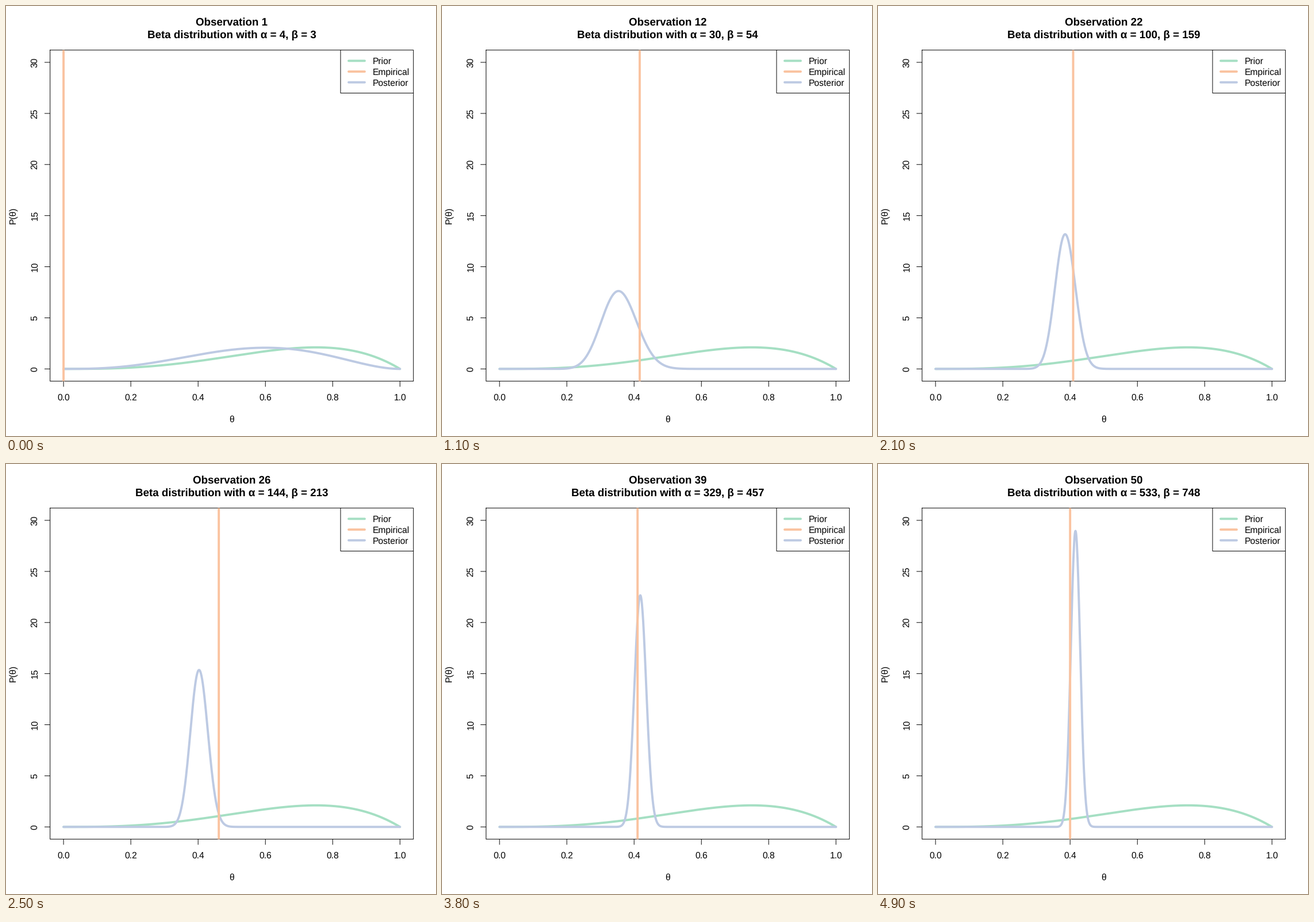
These frames come from a looping animation (748x748 px, 5 s). A matplotlib script:

```python
import math

import matplotlib.pyplot as plt
import numpy as np
from matplotlib.animation import FuncAnimation

plt.rcParams.update({
    "font.family": "Liberation Sans",
    "font.size": 12,
    "text.hinting": "none",
    "toolbar": "None",
})

SIZE, DPI = 748, 93.5
FRAMES, INTERVAL = 50, 100
LINE = 18.7  # height of one margin line in pixels
LEFT, RIGHT = 4.1 * LINE, SIZE - 2.1 * LINE
TOP, BOTTOM = 4.1 * LINE, SIZE - 5.1 * LINE
MID_X, MID_Y = (LEFT + RIGHT) / 2, (TOP + BOTTOM) / 2
THIN, THICK = 0.75, 3.0
GREEN, ORANGE, BLUE = "#a5dfc3", "#fac3a0", "#bdcae3"

PRIOR = (4, 2)
SUCCESSES = (3, 6, 8, 10, 12, 14, 16, 20, 22, 23, 24, 26,
             27, 29, 36, 39, 41, 43, 45, 47)
trials = np.arange(1, FRAMES + 1)
heads = np.cumsum(np.isin(trials, SUCCESSES))
alphas = PRIOR[0] + np.cumsum(heads)
betas = PRIOR[1] + np.cumsum(trials - heads)
theta = np.linspace(1e-9, 1 - 1e-9, 1001)


def px(x):
    return LEFT + (x + 0.04) / 1.08 * (RIGHT - LEFT)


def py(y):
    return BOTTOM - (y / 30 + 0.04) / 1.08 * (BOTTOM - TOP)


def beta_pdf(a, b):
    log_norm = math.lgamma(a + b) - math.lgamma(a) - math.lgamma(b)
    return np.exp(log_norm + (a - 1) * np.log(theta) + (b - 1) * np.log1p(-theta))


fig = plt.figure(figsize=(SIZE / DPI, SIZE / DPI), dpi=DPI, facecolor="white")
ax = fig.add_axes([0, 0, 1, 1])
ax.set(xlim=(0, SIZE), ylim=(SIZE, 0))
ax.axis("off")


def stroke(xs, ys, color="black", width=THIN, cap="round", z=2):
    return ax.plot(xs, ys, color=color, lw=width, solid_capstyle=cap,
                   solid_joinstyle="round", snap=False, zorder=z)[0]


def label(x, y, text, ha="center", **style):
    return ax.text(x, y, text, ha=ha, va="baseline",
                   rotation_mode="anchor", **style)


# Frame and axes
stroke([LEFT, RIGHT, RIGHT, LEFT, LEFT], [TOP, TOP, BOTTOM, BOTTOM, TOP])
for i in range(6):
    x, y = px(i / 5), py(5 * i)
    stroke([x, x], [BOTTOM, BOTTOM + LINE / 2])
    label(x, BOTTOM + 1.8 * LINE, f"{i / 5:.1f}")
    y = py(5 * i)
    stroke([LEFT - LINE / 2, LEFT], [y, y])
    label(LEFT - 1.2 * LINE, y, str(5 * i), rotation=90)
y = py(30)
stroke([LEFT - LINE / 2, LEFT], [y, y])
label(LEFT - 1.2 * LINE, y, "30", rotation=90)
label(MID_X, BOTTOM + 3.8 * LINE, "θ")
label(LEFT - 3.2 * LINE, MID_Y, "P(θ)", rotation=90)

# Legend
legend_x, legend_y = 582, TOP + 4 * LINE
stroke([legend_x, legend_x, RIGHT], [TOP, legend_y, legend_y])
for row, (name, color) in enumerate(
        [("Prior", GREEN), ("Empirical", ORANGE), ("Posterior", BLUE)], 1):
    y = TOP + row * LINE
    stroke([legend_x + 14, legend_x + 42], [y, y], color, THICK)
    label(legend_x + 56, y + 5.6, name, ha="left")

# Curves
stroke(px(theta), py(beta_pdf(*PRIOR)), GREEN, THICK, z=3)
posterior = stroke(px(theta), py(0 * theta), BLUE, THICK, z=4)
empirical = stroke([0, 0], [TOP, BOTTOM], ORANGE, THICK, cap="butt", z=5)

heading = label(MID_X, 34.1, "", fontsize=14.4, weight="bold")
subheading = label(MID_X, 56.5, "", fontsize=14.4, weight="bold")


def update(frame):
    n, a, b = trials[frame], int(alphas[frame]), int(betas[frame])
    heading.set_text(f"Observation {n}")
    subheading.set_text(f"Beta distribution with α = {a}, β = {b}")
    posterior.set_ydata(py(beta_pdf(a, b)))
    empirical.set_xdata([px(heads[frame] / n)] * 2)
    return heading, subheading, posterior, empirical


anim = FuncAnimation(fig, update, frames=FRAMES, interval=INTERVAL,
                     repeat=True, repeat_delay=0, blit=False)
plt.show()
```
